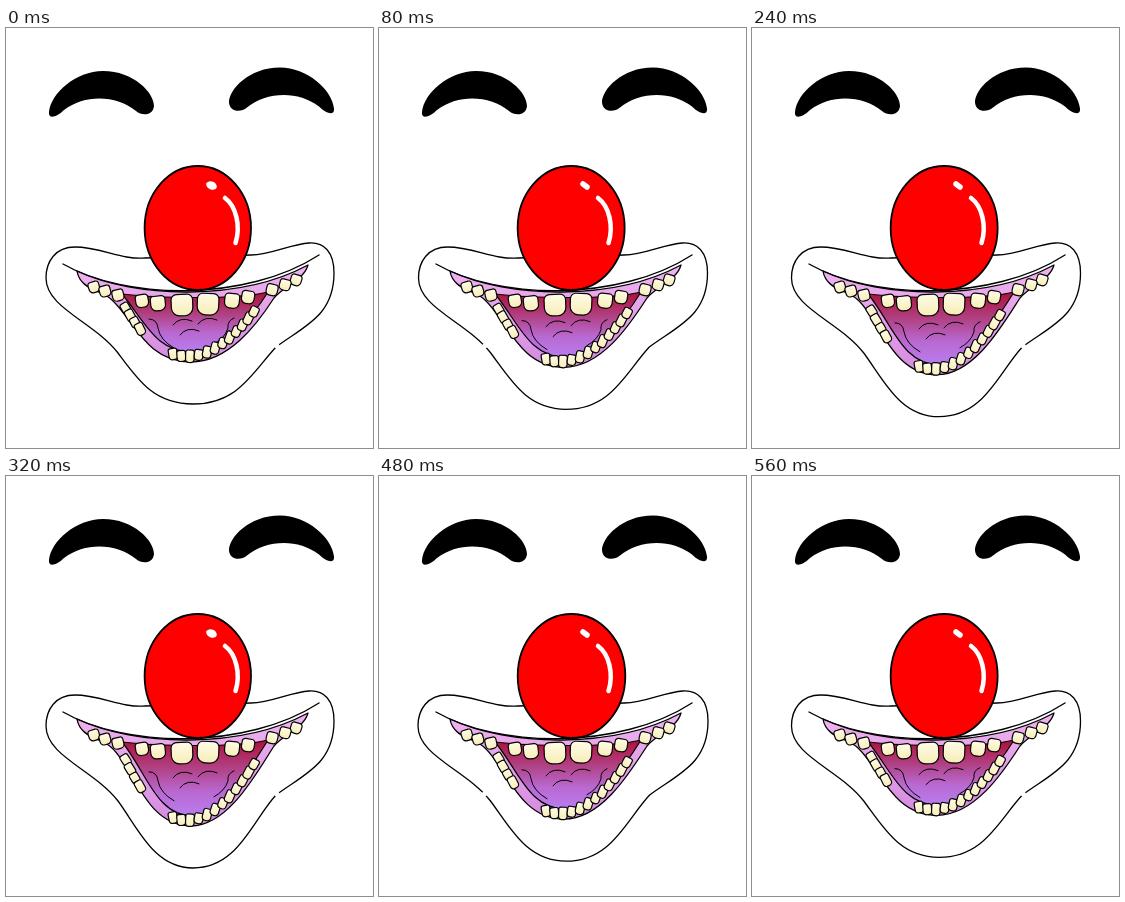
Write an HTML page with a canvas that moves like this. It is 367 by 420 pixels and loops after 640 ms.

```html
<!DOCTYPE html>
<html lang="en">
<head>
<meta charset="utf-8">
<title>Laughing clown</title>
<style>
html, body { margin: 0; height: 100%; overflow: hidden; background: #fff; }
canvas { display: block; }
</style>
</head>
<body>
<canvas id="stage" width="367" height="420"></canvas>
<script>
const ctx = document.getElementById('stage').getContext('2d');
const STEP = 80;
const STEPS = 8;
const JAW_TRAVEL = 16;
const MOUTH_X = 189;

const BROW = `M43,84 C45,65 70,43 97,43 C128,43 148,65 148,78 C147,88 136,88 130,83
  C112,68 80,65 58,82 C50,90 42,91 43,84Z`;

function paint(shape, fill, width, color = '#000') {
  const path = typeof shape === 'string' ? new Path2D(shape) : shape;
  if (fill) {
    ctx.fillStyle = fill;
    ctx.fill(path);
  }
  if (width) {
    ctx.lineWidth = width;
    ctx.strokeStyle = color;
    ctx.stroke(path);
  }
}

function ellipse(x, y, rx, ry, tilt = 0) {
  const path = new Path2D();
  path.ellipse(x, y, rx, ry, tilt, 0, 2 * Math.PI);
  return path;
}

function verticalGradient(top, bottom, colors) {
  const gradient = ctx.createLinearGradient(0, top, 0, bottom);
  colors.forEach((color, i) => gradient.addColorStop(i / (colors.length - 1), color));
  return gradient;
}

function drawTooth(x, y, w, h, tilt) {
  const tooth = new Path2D();
  tooth.roundRect(-w / 2, -h / 2, w, h, [w * .25, w * .25, w * .38, w * .38]);
  ctx.save();
  ctx.translate(x, y);
  ctx.rotate(tilt);
  paint(tooth, verticalGradient(-h / 2, h / 2, ['#fffbe6', '#f7edb8']), 1.2);
  ctx.restore();
}

// Upper teeth mirror each other and shrink away from the middle.
function drawUpperTeeth() {
  for (const offset of [101, 90, 77, 53, 37, 13]) {
    const size = 10.5 + 11 * Math.exp((13 - offset) / 25);
    for (const side of [-1, 1]) {
      const y = 277 - .0021 * offset ** 2 - side * .035 * offset;
      drawTooth(MOUTH_X + side * offset, y, size, size, side * offset * .003);
    }
  }
}

// Point on the curve that carries the lower teeth, u from 0 to 1.
function lowerGum(u, drop) {
  const v = 1 - u;
  const cubic = (a, b, c, d) => v ** 3 * a + 3 * v * v * u * b + 3 * v * u * u * c + u ** 3 * d;
  const pull = drop * 4 / 3;
  return [cubic(113, 150, 200, 262), cubic(268, 340 + pull, 358 + pull, 264)];
}

function gumDirection(u, drop) {
  const [x1, y1] = lowerGum(u - .005, drop);
  const [x2, y2] = lowerGum(u + .005, drop);
  return [(x2 - x1) * 100, (y2 - y1) * 100];
}

// Evenly spaced along the closed jaw, with a gap on the left.
const lowerTeeth = [];
for (let u = .06; u < .95; u += 8.6 / Math.hypot(...gumDirection(u, 0))) {
  if (u < .2 || u > .41) lowerTeeth.push(u);
}

function drawLowerTeeth(drop) {
  lowerTeeth.forEach((u, i) => {
    const [dx, dy] = gumDirection(u, drop);
    drawTooth(...lowerGum(u, drop), 8.6, 11.5 + Math.sin(i * 2.4), -Math.atan2(dy, dx) / 2);
  });
}

function drawMouth(drop) {
  const lip = 334 + drop;
  const floor = 324 + drop;
  paint(`M71,243 C130,271 235,273 302,237 C298,252 278,258 268,270
    C250,298 222,${lip} 185,${lip} C140,${lip} 128,292 106,272 C96,262 74,262 71,243Z`,
    verticalGradient(240, lip, ['#efb2ef', '#e2a0e8', '#d48ade']), 1.3);
  paint('M57,236 C120,272 240,274 313,227', null, 1.4);

  const cavity = new Path2D(`M116,266 C150,270 230,272 262,264
    C246,290 215,${floor} 187,${floor} C150,${floor} 140,295 116,266Z`);
  paint(cavity, verticalGradient(266, floor, ['#ad1440', '#b03f80', '#b968d0', '#b97df0']), 1.2);

  ctx.save();
  ctx.clip(cavity);
  ctx.translate(0, drop * .3);
  paint('M143,291 q8,0 9,9 q2,12 16,20 M228,290 q-7,3 -6,10 q-3,10 -14,16', null, 1);
  for (const [x, y] of [[167, 297], [192, 296], [174, 307]]) {
    paint(`M${x},${y} q7,-9 19,-4`, null, 1);
  }
  ctx.restore();

  drawLowerTeeth(drop);
  drawUpperTeeth();
}

function drawFace(drop, swell, phase) {
  const chin = 376 + drop;
  ctx.save();
  ctx.translate(184, 0);
  ctx.scale(1 + swell * .007, 1);
  ctx.translate(-184, 0);
  paint(`M139,230 C115,232 95,219 69,219 C49,219 40,234 40,250
    C40,280 88,294 112,325 C132,352 148,${chin} 187,${chin}
    C232,${chin} 246,345 270,319 C298,298 328,288 328,245
    C328,224 318,214 303,215 C285,216 265,227 245,227Z`, null, 1.3);
  // The pen skips on one side of the chin.
  paint(ellipse(phase % 3 ? 106 : 271, 318, 2.5, 2.5), '#fff');
  ctx.restore();
}

function drawBrows() {
  paint(BROW, '#000');
  ctx.save();
  ctx.translate(371, -3.5);
  ctx.scale(-1, 1);
  paint(BROW, '#000');
  ctx.restore();
}

function drawNose(swell, phase) {
  paint(ellipse(191.8 + swell * .7, 200, 53.2 + swell * .6, 62), '#f00', 1.8);
  if (phase === 0) paint(ellipse(205.5, 157.5, 5.5, 4, .4), '#fff');
  else paint('M204,156 l4,3', null, 5.5, '#fff');
  paint('M219,170 C230,178 235,198 229.5,215', null, 4.5, '#fff');
}

function draw(step) {
  const openness = 1 - Math.abs(step / (STEPS / 2) - 1);
  const drop = JAW_TRAVEL * openness ** .8;
  // Four alternating drawings give the hand-drawn wobble.
  const phase = step % 4;
  const swell = .5 - .5 * Math.cos(phase * Math.PI / 2);

  ctx.fillStyle = '#fff';
  ctx.fillRect(0, 0, 367, 420);
  ctx.lineCap = ctx.lineJoin = 'round';
  drawBrows();
  drawFace(drop, swell, phase);
  drawMouth(drop);
  drawNose(swell, phase);
}

function tick() {
  draw(Math.floor(performance.now() / STEP) % STEPS);
  requestAnimationFrame(tick);
}
tick();
</script>
</body>
</html>
```
